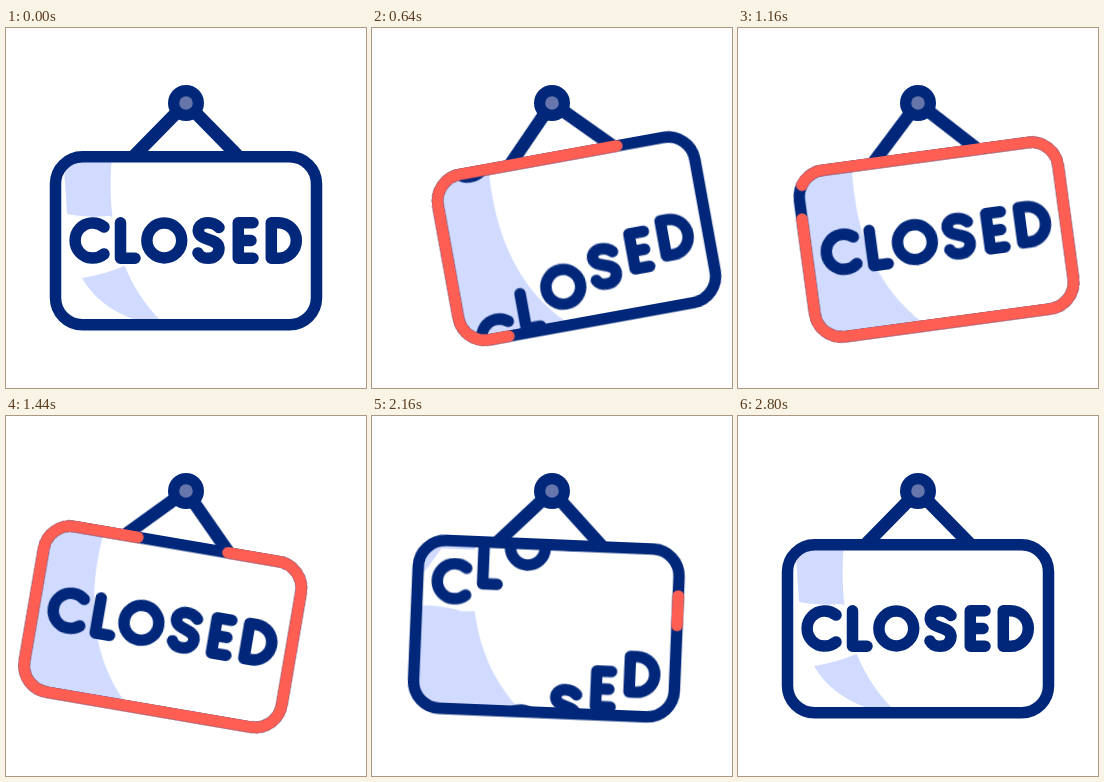
Recreate the animation shown at these times as an HTML page. Size 360x360 px, loop 3 s.

```html
<!DOCTYPE html>
<html lang="en">
<head>
<meta charset="utf-8">
<title>Closed sign</title>
<style>
  @property --offset { syntax: "<number>"; inherits: false; initial-value: 457; }
  @property --head { syntax: "<number>"; inherits: false; initial-value: 0; }
  @property --tail { syntax: "<number>"; inherits: false; initial-value: 0; }

  :root {
    --navy: #00277a; --red: #ff5f52; --tint: #d0dbff;
    --ease: cubic-bezier(.65, 0, .35, 1);
    --glide: cubic-bezier(.33, 0, .2, 1);
  }
  html, body { margin: 0; width: 100%; height: 100%; overflow: hidden; background: #fff; }
  svg { display: block; width: 100vw; height: 100vh; }

  .line { fill: none; stroke: var(--navy); stroke-width: 11.5; stroke-linecap: round; stroke-linejoin: round; }
  .cord { stroke-width: 13; }

  .sign { transform-origin: 180px 75px; animation: swing 3s var(--ease) infinite; }
  @keyframes swing {
    0%, 2.67% { transform: rotate(0deg); }
    30.5% { transform: rotate(-12deg); }
    53.17%, 59.5% { transform: rotate(11deg); }
    79.7%, 100% { transform: rotate(0deg); }
  }

  /* Each letter falls one pitch twice per loop; its copies wait above. */
  .letter { animation: fall 3s calc(var(--i) * 37ms) var(--ease) infinite; }
  @keyframes fall {
    0%, 7.43% { transform: translateY(0); }
    36.1%, 54.67% { transform: translateY(180px); }
    83.33%, 100% { transform: translateY(360px); }
  }

  .runner {
    stroke: var(--red);
    stroke-dasharray: calc((var(--head) - var(--tail)) * 1px) calc((812 - var(--head) + var(--tail)) * 1px);
    stroke-dashoffset: calc((var(--offset) + var(--tail)) * -1px);
    animation: drift 3s linear infinite, head 3s var(--glide) infinite,
      tail 3s var(--glide) infinite, run 3s step-end infinite;
  }
  @keyframes drift {
    0%, 9% { --offset: 457; }
    38.67% { --offset: 785; }
    81.67%, 100% { --offset: 1204; }
  }
  @keyframes head {
    0%, 9% { --head: 0; }
    49%, 100% { --head: 812; }
  }
  @keyframes tail {
    0%, 41.67% { --tail: 0; }
    81.67%, 100% { --tail: 812; }
  }
  @keyframes run {
    0% { opacity: 0; }
    9% { opacity: 1; }
    81.67%, 100% { opacity: 0; }
  }

  /* Gaps in the tint */
  .gap { fill: #fff; animation: 3s step-end infinite; }
  .rest { animation-name: rest; }
  .tilt { animation-name: tilt; }
  .back { animation-name: back; }
  @keyframes rest { 0% { opacity: 1; } 6.67% { opacity: 0; } 79.33%, 100% { opacity: 1; } }
  @keyframes tilt { 0% { opacity: 0; } 54.67% { opacity: 1; } 65.33%, 100% { opacity: 0; } }
  @keyframes back { 0% { opacity: 0; } 65.33% { opacity: 1; } 79.33%, 100% { opacity: 0; } }
</style>
</head>
<body>
<svg viewBox="0 0 360 360" role="img" aria-label="CLOSED">
  <defs>
    <clipPath id="board"><rect x="49.5" y="128.8" width="261" height="168" rx="27"/></clipPath>
  </defs>
  <g class="sign">
    <path class="line cord" d="M129 127 180 75 231 127"/>
    <g clip-path="url(#board)">
      <rect x="49" y="128" width="262" height="170" fill="#fff"/>
      <path fill="var(--tint)" d="M49 128H106C101 184 108 246 156 294V298H49Z"/>
      <path class="gap rest" d="M49 128H66Q56 140 59 155L61 186Q80 190 103 188L112 190 126 240 118 238Q100 246 76 250Q92 278 127 291L100 300H49Z"/>
      <path class="gap tilt" d="M56 208 72 200Q84 188 100 192L122 196V236Q90 240 70 240L56 232Z"/>
      <path class="gap back" d="M58 158 72 137H112V198L95 199Q75 193 52 195V165Z"/>
      <g id="word" class="line"></g>
    </g>
    <rect class="line" x="49.5" y="128.8" width="261" height="168" rx="27"/>
    <rect class="line runner" x="49.5" y="128.8" width="261" height="168" rx="27" pathLength="812"/>
  </g>
  <circle cx="180" cy="75" r="18" fill="var(--navy)"/>
  <circle cx="180" cy="75" r="6.8" fill="#6675aa"/>
</svg>
<script>
  const PITCH = 180;
  const letters = {
    C: "M98 199A17.6 17.6 0 1 0 98 226",
    L: "M114.5 194.7V230.3H129",
    O: "M140.9 212.5a17.4 17.4 0 1 1 34.8 0a17.4 17.4 0 1 1 -34.8 0",
    S: "M213 199.5C209.5 195.5 205 194.7 202 194.7C194.5 194.7 191.5 200 192.5 204C194.5 213 212 210 213 220C213 227 207.5 230.3 202 230.3C197 230.3 193.5 228 192 225",
    E: "M247 194.7H232.3V230.3H247M232.3 212.5H245",
    D: "M265.3 194.7V230.3H272.5A17.8 17.8 0 0 0 272.5 194.7Z"
  };
  const copies = d => [0, 1, 2]
    .map(n => `<path d="${d}" transform="translate(0 ${-n * PITCH})"/>`).join("");
  document.getElementById("word").innerHTML = Object.values(letters)
    .map((d, i) => `<g class="letter" style="--i:${i}">${copies(d)}</g>`).join("");
</script>
</body>
</html>
```
